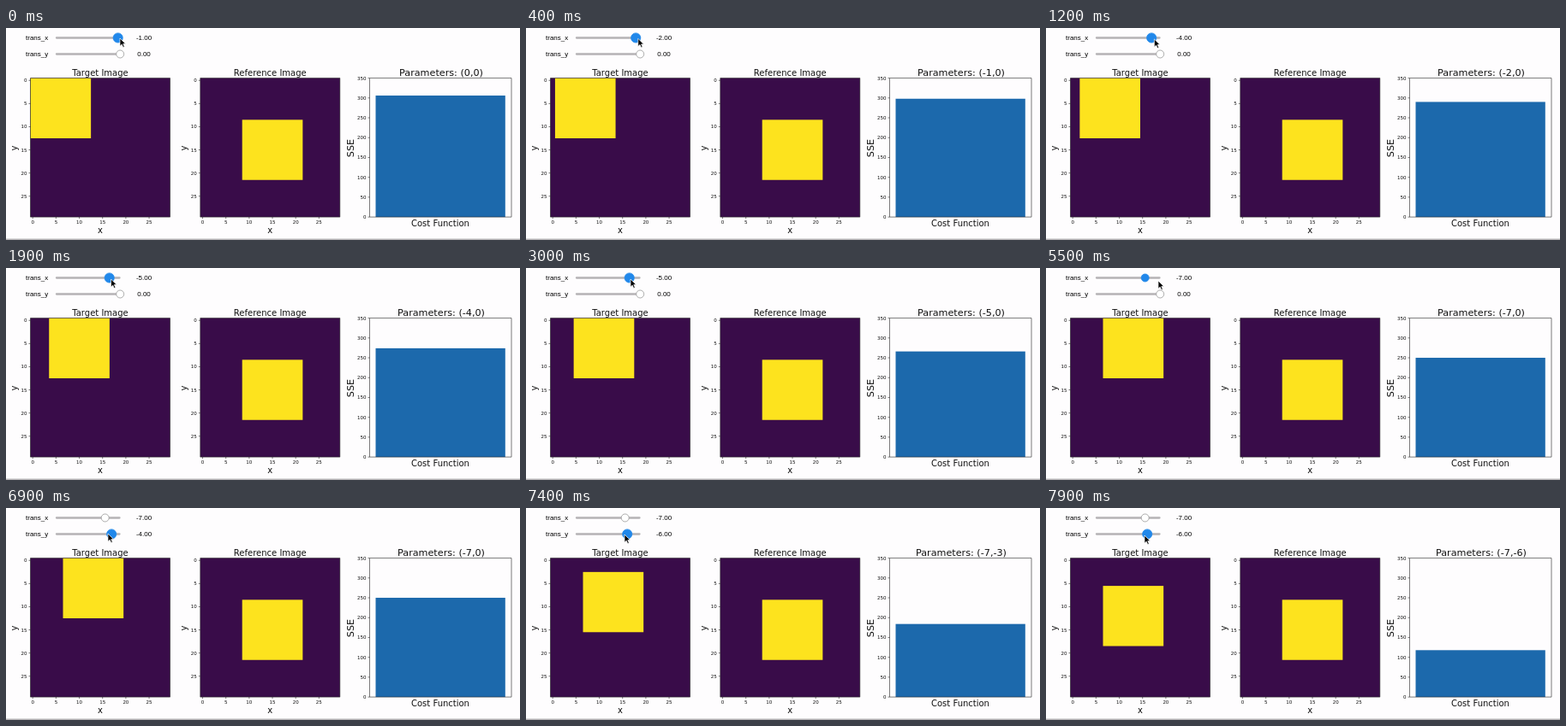
These frames come from a looping animation (600x248 px, 8000 ms). An HTML page:

```html
<!DOCTYPE html>
<html lang="en">
<head>
<meta charset="utf-8">
<title>Image registration cost</title>
<style>
  html, body { margin: 0; width: 100%; height: 100%; overflow: hidden; background: #fefdfe; }
  svg { display: block; }
  text { font: 5.5px "DejaVu Sans", sans-serif; fill: #111; text-anchor: middle; }
  .ui { font: 8px "Liberation Sans", Arial, sans-serif; fill: #000; }
  .label { font-size: 10px; }
  .big { font-size: 11.2px; }
  .end { text-anchor: end; }
  .start { text-anchor: start; }
</style>
</head>
<body>
<svg id="stage" width="600" height="248" viewBox="0 0 600 248"></svg>
<script>
const LOOP = 8000, TOP = 58.6, WIDTH = 163, HEIGHT = 162.5, BOTTOM = TOP + HEIGHT;
const CELLS = 30, SIDE = 13, CENTRE = 9, UX = WIDTH / CELLS, UY = HEIGHT / CELLS;
const TARGET_X = 28.5, REFERENCE_X = 226.8, MAX_COST = 350;
const BLUE = '#1c69ac', YELLOW = '#fde31e', PURPLE = '#390c49', ACTIVE = '#2188ea';
const stage = document.getElementById('stage');

function set(node, attrs) {
  for (const key in attrs) node.setAttribute(key, attrs[key]);
  return node;
}
function add(tag, attrs) {
  return stage.appendChild(set(document.createElementNS('http://www.w3.org/2000/svg', tag), attrs));
}
function text(content, x, y, cls = '', attrs = {}) {
  const node = add('text', { x, y, class: cls, ...attrs });
  node.textContent = content;
  return node;
}
const rect = (x, y, width, height, fill) => add('rect', { x, y, width, height, fill });
const line = (d, attrs) => add('path', { d, fill: 'none', stroke: '#222', 'stroke-width': 0.6, ...attrs });
const frame = (x, width) => line(`M${x} ${TOP}h${width}v${HEIGHT}h${-width}z`);
const sideways = (content, x, cls) => text(content, 0, 0, cls, {
  transform: `translate(${x} 140.5) rotate(-90)`
});

function imagePlot(left, title, offset) {
  rect(left, TOP, WIDTH, HEIGHT, PURPLE);
  const square = rect(left + offset * UX, TOP + offset * UY, SIDE * UX, SIDE * UY, YELLOW);
  frame(left, WIDTH);
  for (let v = 0; v < CELLS; v += 5) {
    const x = left + (v + 0.5) * UX, y = TOP + (v + 0.5) * UY;
    line(`M${x} ${BOTTOM}v2M${left} ${y}h-2`);
    text(v, x, 229);
    text(v, left - 4, y + 2, 'end');
  }
  text(title, left + WIDTH / 2, 55.5, 'label');
  text('x', left + WIDTH / 2, 240, 'label');
  sideways('y', left - 15.5, 'label');
  return square;
}

function slider(name, y) {
  text(name, 23, y + 2.5, 'ui start');
  line(`M59 ${y}H132.5`, { stroke: '#b5b3b5', 'stroke-width': 2.3, 'stroke-linecap': 'round' });
  const knob = add('circle', { cy: y, 'stroke-width': 0.8 });
  const value = text('', 161, y + 2.5, 'ui');
  return (v, active, held) => {
    set(knob, {
      cx: 133.2 + 2.5 * v, r: held ? 5.6 : 4.5,
      fill: active ? ACTIVE : '#fff', stroke: active ? ACTIVE : '#999'
    });
    value.textContent = v.toFixed(2);
  };
}

const setX = slider('trans_x', 11.5);
const setY = slider('trans_y', 30.5);
const target = imagePlot(TARGET_X, 'Target Image', 0);
imagePlot(REFERENCE_X, 'Reference Image', CENTRE);

const bar = rect(431.5, TOP, 151.3, 0, BLUE);
frame(424.5, 165.5);
for (let v = 0; v <= MAX_COST; v += 50) {
  const y = BOTTOM - HEIGHT * v / MAX_COST;
  line(`M424.5 ${y}h-2`);
  text(v, 420.5, y + 2, 'end');
}
const title = text('', 508, 56, 'big');
text('Cost Function', 507, 231.5, 'label');
sideways('SSE', 405.8, 'big');
rect(0, 246.5, 600, 1.5, '#b4b2b4');
const cursor = add('path', {
  d: 'M0 0V9.2L2.2 7.2 3.7 10.6 5.3 9.9 3.8 6.6H6.6Z', stroke: '#fff', 'stroke-width': 0.7
});

const overlap = shift => Math.max(0, SIDE - Math.abs(CENTRE - shift));

function draw(now) {
  const t = Math.floor(now % LOOP / 100) * 100;
  const ramp = (from, to, amount) => amount * Math.min(1, Math.max(0, (t - from) / (to - from)));
  const steps = (...args) => Math.round(ramp(...args));

  // Two drags on x, one on y; the plots trail behind the sliders.
  const onY = t >= 6400;
  setX(-1 - steps(0, 1400, 4) - steps(3450, 4850, 2), !onY, t < 4900);
  setY(-steps(6300, 7200, 6), onY, onY);

  const dx = steps(100, 2400, 5) + steps(3550, 5350, 2);
  const dy = steps(7030, 7870, 6);
  set(target, { x: TARGET_X + dx * UX, y: TOP + dy * UY });
  const sse = 2 * (SIDE * SIDE - overlap(dx) * overlap(dy));
  const height = sse / MAX_COST * HEIGHT;
  set(bar, { y: BOTTOM - height, height });
  title.textContent = `Parameters: (${-dx || 0},${-dy || 0})`;

  const x = 133 - ramp(0, 2000, 11) - ramp(3300, 4800, 5) + ramp(5400, 5500, 14) - ramp(6300, 7100, 16);
  const y = 12 + ramp(0, 1200, 1) + ramp(3300, 4100, 1) + ramp(5400, 5500, 1) + ramp(5500, 6000, 15)
    + ramp(6900, 7900, 2);
  set(cursor, { transform: `translate(${x} ${y})` });
}

const start = performance.now();
function loop() {
  draw(performance.now() - start);
  requestAnimationFrame(loop);
}
loop();
</script>
</body>
</html>
```
